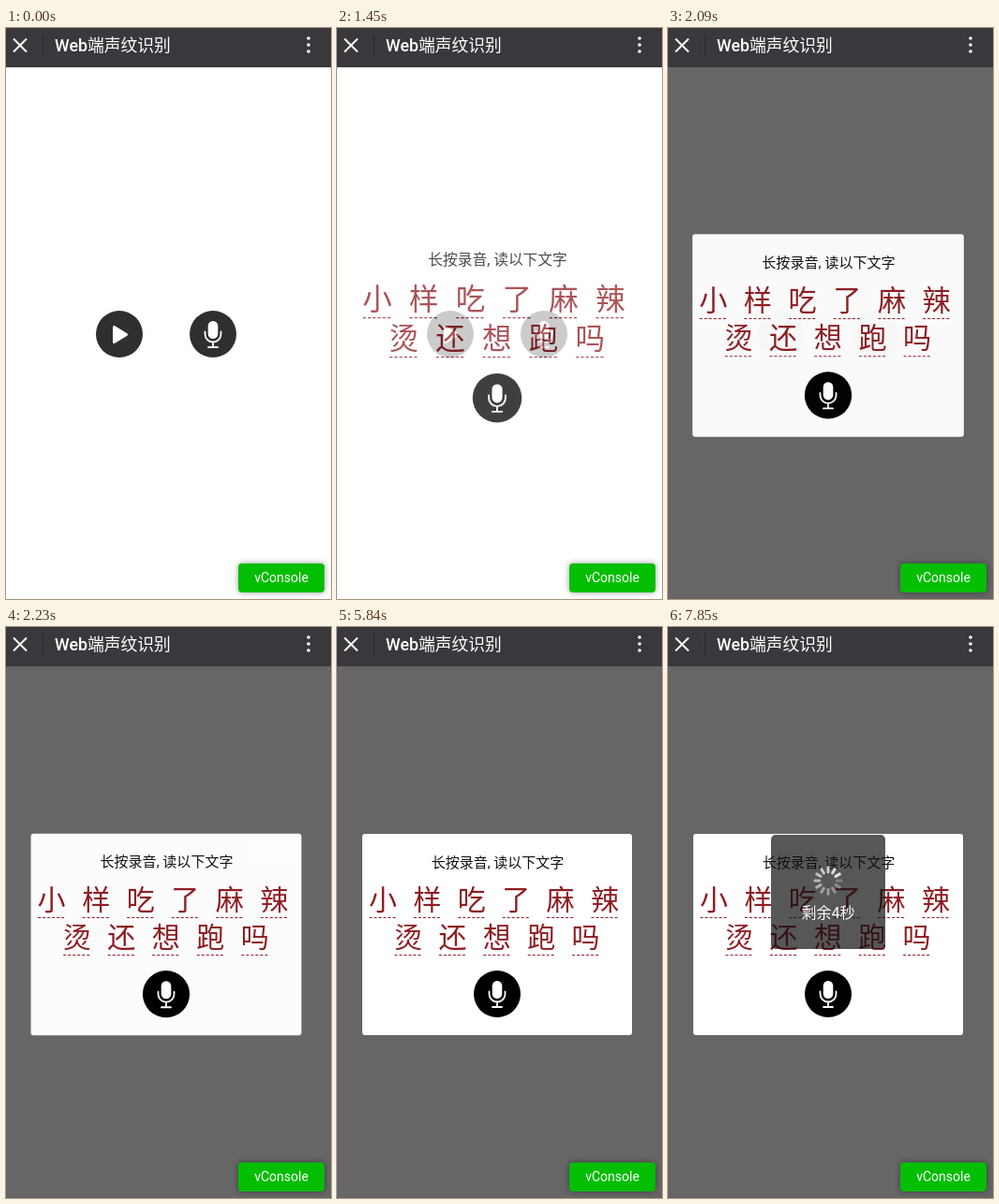
Write an HTML page that moves like this. It is 347x610 px and loops after 8 s.

```html
<!DOCTYPE html>
<html lang="zh-CN">
<head>
<meta charset="utf-8">
<style>
  html, body { margin: 0; width: 100%; height: 100%; overflow: hidden; background: #fff; }
  svg { display: block; font-family: Roboto, "Noto Sans CJK SC", "Noto Sans CJK", sans-serif; }
  .cjk { font-family: "Noto Sans CJK SC", "Noto Sans CJK", sans-serif; font-weight: 300; }
  .mid { text-anchor: middle; }
  .button { filter: drop-shadow(0 0 3px rgba(0, 0, 0, .4)); }
</style>
</head>
<body>
<svg width="347" height="610" viewBox="0 0 347 610">
  <defs>
    <g id="mic" fill="none" stroke="#fff" stroke-width="1.8">
      <circle r="25" stroke="none" fill="currentColor"/>
      <rect x="-5.3" y="-14" width="10.6" height="19" rx="5.3" fill="#fff" stroke="none"/>
      <path d="M-8.5 -2.5V0a8.5 8.5 0 0 0 17 0V-2.5M0 8.5V14M-5 14H5" stroke-linecap="round"/>
    </g>
  </defs>

  <circle cx="121" cy="327" r="25" fill="#2f2f2f"/>
  <path d="M115.5 319.5V335.5L128.5 327.5Z" fill="#fff" stroke="#fff" stroke-width="3" stroke-linejoin="round"/>
  <use href="#mic" x="221" y="327" color="#2f2f2f"/>

  <rect id="mask" y="41" width="347" height="569" fill="#000" opacity=".6"/>

  <rect width="347" height="42" fill="#39383d"/>
  <path d="M8 11.5L22 25.5M22 11.5L8 25.5" stroke="#fff" stroke-width="2"/>
  <path d="M39.5 6V30" stroke="#2b2a2f"/>
  <text x="52" y="25" font-size="17.8" fill="#fff"><tspan font-weight="500">Web</tspan><tspan class="cjk">端声纹识别</tspan></text>
  <g fill="#fff"><circle cx="323" cy="11" r="1.8"/><circle cx="323" cy="18" r="1.8"/><circle cx="323" cy="25" r="1.8"/></g>

  <g id="dialog">
    <rect x="27" y="221" width="288" height="215" rx="3" fill="#fff"/>
    <text class="mid" x="171.5" y="256.5" font-size="15" fill="#111">长按录音, 读以下文字</text>
    <g id="words" class="cjk" font-size="30" fill="#8f1d22" stroke-dasharray="3 2"></g>
    <use href="#mic" x="171" y="392" color="#000"/>
  </g>

  <g id="toast">
    <rect x="110" y="222" width="122" height="122" rx="5" fill="#111" opacity=".7"/>
    <g id="spinner" transform="translate(171 271)" fill="#e4e4e6"></g>
    <text id="left" class="mid" x="171" y="311" font-size="16" fill="#fff"></text>
  </g>

  <rect class="button" x="248" y="572" width="92" height="31" rx="4" fill="#04be02"/>
  <text class="mid" x="294" y="592" font-size="14" fill="#fff">vConsole</text>
</svg>
<script>
const LOOP = 8000, MASK_AT = 2090, TOAST_AT = 6740, COUNT_AT = 7850;
// [time, dialog opacity]
const FADE = [[0, 0], [1210, .24], [1330, .55], [1450, .75], [1720, .85], [1840, .925],
  [2090, .97], [2230, .985], [2510, .995], [2630, 1]];
const TICKS = [6740, 7020, 7170, 7450, 7700, 7850];
const $ = id => document.getElementById(id);

function add(parent, tag, attrs, text = '') {
  const el = document.createElementNS('http://www.w3.org/2000/svg', tag);
  for (const key in attrs) el.setAttribute(key, attrs[key]);
  el.textContent = text;
  return parent.appendChild(el);
}

function addRow(text, x0, y) {
  [...text].forEach((char, i) => {
    const x = x0 + i * 47.4;
    add($('words'), 'text', { x: x - .5, y }, char);
    add($('words'), 'path', { d: `M${x} ${y + 8.5}h29.5`, stroke: '#8f1d22' });
  });
}
addRow('小样吃了麻辣', 34.5, 302);
addRow('烫还想跑吗', 61.5, 342);

const leaves = Array.from({ length: 12 }, (_, i) =>
  add($('spinner'), 'rect', { x: 7.7, y: -1.5, width: 8, height: 3, rx: 1.5, transform: `rotate(${i * 30 - 90})` }));

const show = (id, on) => $(id).setAttribute('visibility', on ? 'visible' : 'hidden');

function draw(t) {
  const fade = FADE.findLast(step => step[0] <= t)[1];
  const scale = 1.2 - .2 * fade;
  $('dialog').setAttribute('opacity', fade);
  $('dialog').setAttribute('transform', `translate(171 328.5) scale(${scale}) translate(-171 -328.5)`);
  show('mask', t >= MASK_AT);
  show('toast', t >= TOAST_AT);
  $('left').textContent = `剩余${t < COUNT_AT ? 5 : 4}秒`;

  const tick = TICKS.findLast(time => time <= t) ?? TOAST_AT;
  const head = 190 + (tick - 7020) * 360 / 1250;
  leaves.forEach((leaf, i) => {
    const lag = (head - i * 30 + 720) % 360 / 360;
    leaf.setAttribute('opacity', 1 - .75 * lag);
  });
}

const start = performance.now();
function frame() {
  draw((performance.now() - start) % LOOP);
  requestAnimationFrame(frame);
}
frame();
</script>
</body>
</html>
```
